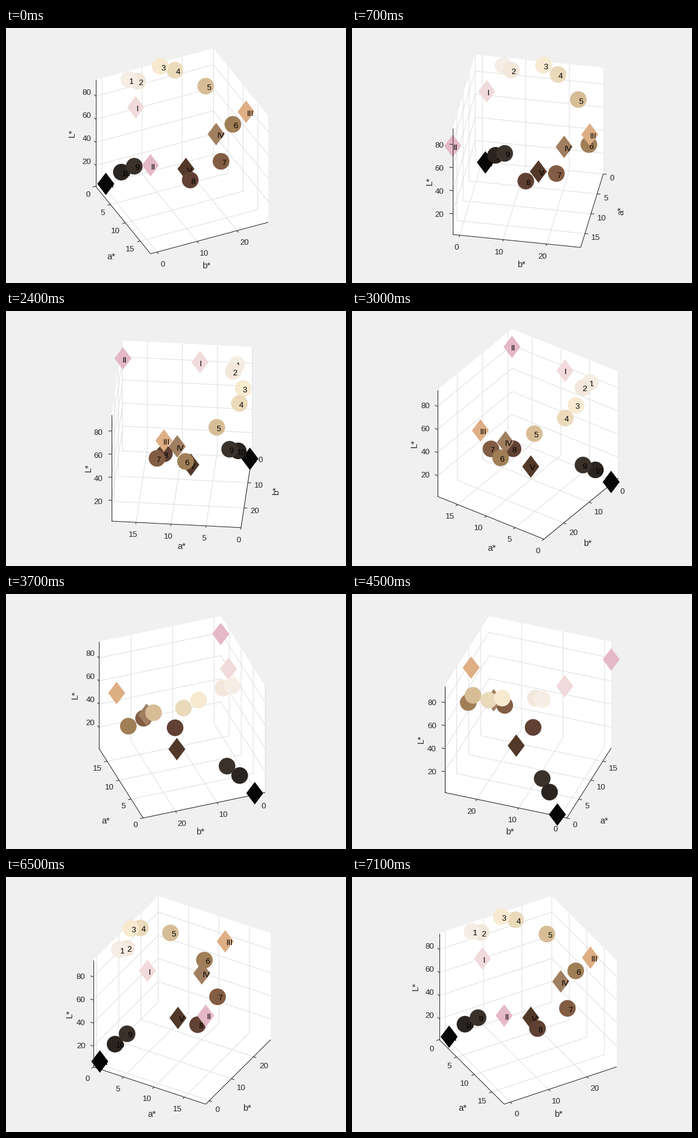
These frames come from a looping animation (560 by 420 pixels, 7200 ms). A matplotlib script:

```python
import numpy as np
import matplotlib.pyplot as plt
from matplotlib.animation import FuncAnimation
from matplotlib.collections import LineCollection
from matplotlib.patches import Circle, Polygon

W, H, DPI = 560, 420, 100
PX = 72 / DPI
FRAMES, INTERVAL = 72, 100
CX, CY = 289.8, 202.65
HALF = 107
ELEV = np.radians(35)
SE, CE = np.sin(ELEV), np.cos(ELEV)
INK = "#262626"
GRID = "#dfdfdf"
LIMITS = [(0, 18.5), (-1.6, 27.8), (2, 94.2)]
TICKS = [(0, 5, 10, 15), (0, 10, 20), (20, 40, 60, 80)]
NAMES = ["a*", "b*", "L*"]

# label, colour, position inside the cube (a, b, L from its centre)
SAMPLES = [
    ("1", "#f6ede4", (-86, -56.6, 105.8)),
    ("2", "#f3e7db", (-81, -42.5, 101.6)),
    ("3", "#f7ead0", (-102, 8, 103.3)),
    ("4", "#eadaba", (-98, 33, 90.5)),
    ("5", "#d7bd96", (-64, 73, 68.3)),
    ("6", "#a07e56", (-14.6, 99.3, 15)),
    ("7", "#825c43", (36.5, 54, -13.5)),
    ("8", "#604134", (29, 1.5, -40.3)),
    ("9", "#3a312a", (-74.3, -52, -62.3)),
    ("10", "#292420", (-87, -69.5, -77)),
    ("I", "#f1dadb", (-23.4, -73, 94.9)),
    ("II", "#e5b8c8", (107, -107, 71)),
    ("III", "#deae84", (20.5, 107, 60.3)),
    ("IV", "#a07e60", (2.5, 61, 17.5)),
    ("V", "#523828", (-16, 14.7, -50.5)),
    ("VI", "#060606", (-104.5, -89.6, -105.8)),
]
LABEL_SHIFT = np.array([1.16, 0.73, 0.19])

fig = plt.figure(figsize=(W / DPI, H / DPI), dpi=DPI, facecolor="#f0f0f0")
ax = fig.add_axes([0, 0, 1, 1])
plt.rcParams["font.family"] = "Liberation Sans"


class View:
    """Orthographic view of the cube for one azimuth."""

    def __init__(self, degrees):
        az = np.radians(degrees)
        self.c, self.s = np.cos(az), np.sin(az)

    def direction(self, v):
        a, b, z = v
        return np.array([a * self.c + b * self.s,
                         SE * (a * self.s - b * self.c) - CE * z])

    def point(self, p):
        return self.direction(p) + (CX, CY)

    def depth(self, p):
        return CE * (p[0] * self.s - p[1] * self.c) + SE * p[2]


def scaled(axis, value):
    low, high = LIMITS[axis]
    return HALF * (2 * (value - low) / (high - low) - 1)


def corner(base, axis=None, value=0):
    p = np.array(base, float) * HALF
    if axis is not None:
        p[axis] = value
    return p


def unit(axis, sign):
    v = np.zeros(3)
    v[axis] = sign
    return v


def write(x, y, s, size=13.33, color=INK, ha="center", rotation=0, z=4):
    if rotation:
        ax.text(x, y, s, size=size * PX, color=color, ha="center",
                va="center", rotation=rotation, zorder=z)
    else:
        ax.text(x, y + 0.36 * size, s, size=size * PX, color=color, ha=ha,
                va="baseline", zorder=z)


def lines(segments, color, z):
    ax.add_collection(LineCollection(segments, colors=color,
                                     linewidths=PX, zorder=z))


def draw_box(view, fa, fb):
    """White floor and back walls with their grid."""
    hull = [(-fa, -fb, 1), (-fa, fb, 1), (-fa, fb, -1),
            (fa, fb, -1), (fa, -fb, -1), (fa, -fb, 1)]
    ax.add_patch(Polygon([view.point(corner(p)) for p in hull],
                         fc="white", ec="none", zorder=0))
    paths = {
        0: [(0, fb, -1), (0, -fb, -1), (0, -fb, 1)],
        1: [(fa, 0, -1), (-fa, 0, -1), (-fa, 0, 1)],
        2: [(fa, -fb, 0), (-fa, -fb, 0), (-fa, fb, 0)],
    }
    grid = [[view.point(corner(p, axis, scaled(axis, t))) for p in path]
            for axis, path in paths.items() for t in TICKS[axis]]
    lines(grid, GRID, 1)


def draw_floor_axis(view, axis, base, out):
    ends = [view.point(corner(base, axis, e)) for e in (-HALF, HALF)]
    u = view.direction(out)
    along = ends[1] - ends[0]
    n = np.array([along[1], -along[0]]) / np.hypot(*along)
    if n @ u < 0:
        n = -n
    segments = [ends]
    for t in TICKS[axis]:
        p = view.point(corner(base, axis, scaled(axis, t)))
        segments.append([p, p + 5.35 * u])
        reach = 10 + 3.7 * len(str(t))
        x = np.sign(u[0]) * np.sqrt(abs(u[0])) * reach
        write(p[0] + x + 0.5, p[1] + 19 * n[1] + 0.5, str(t))
    lines(segments, INK, 2)

    mid = (ends[0] + ends[1]) / 2
    side, steep = np.sign(np.round(n[0], 4)), abs(n[0])
    if steep > 0.93:
        write(mid[0] + 48.5 * side, mid[1], NAMES[axis], 14.67, rotation=90)
    else:
        x = side * (47 * steep ** 2 - 8.5)
        y = 33.2 + 48.7 * steep - 18.3 * steep ** 2
        write(mid[0] + x, mid[1] + y, NAMES[axis], 14.67)


def draw_height_axis(view, la, lb):
    base = (la, lb, 0)
    ends = [view.point(corner(base, 2, e)) for e in (-HALF, HALF)]
    u = min((view.direction(unit(0, la)), view.direction(unit(1, lb))),
            key=lambda d: d[1])
    segments = [ends]
    for t in TICKS[2]:
        p = view.point(corner(base, 2, scaled(2, t)))
        segments.append([p, p + 5.35 * u])
        write(p[0] - 9.5 - 12.5 * abs(u[0]), p[1] + 1 - 30 * u[1] ** 2, str(t))
    lines(segments, INK, 90)
    mid = (ends[0] + ends[1]) / 2
    write(mid[0] - 38.5, mid[1], NAMES[2], 14.67, rotation=90)


def draw_samples(view):
    """Markers and labels, farthest first, so that near ones cover far ones."""
    items = []
    for label, color, pos in SAMPLES:
        pos = np.array(pos)
        items.append((view.depth(pos), pos, label, color))
        tag = pos + LABEL_SHIFT
        items.append((view.depth(tag), tag, label, None))
    items.sort(key=lambda item: item[0])
    for i, (_, pos, label, color) in enumerate(items):
        x, y = view.point(pos)
        z = 10 + i
        if color is None:
            write(x, y + 1.5, label, color="black", ha="left", z=z)
        elif label.isdigit():
            ax.add_patch(Circle((x, y), 13.7, fc=color, ec="none", zorder=z))
        else:
            rhomb = [(x - 14, y), (x, y - 18.5), (x + 14, y), (x, y + 18.5)]
            ax.add_patch(Polygon(rhomb, fc=color, ec="none", zorder=z))


def draw(frame):
    ax.clear()
    ax.set_xlim(0, W)
    ax.set_ylim(H, 0)
    ax.axis("off")
    # tiny shift keeps the nearest corner unambiguous at right angles
    view = View(65 + 5 * frame + 1e-6)
    fa, fb = np.sign(view.s), -np.sign(view.c)
    draw_box(view, fa, fb)
    draw_floor_axis(view, 0, (0, fb, -1), unit(1, fb))
    draw_floor_axis(view, 1, (fa, 0, -1), unit(0, fa))
    draw_height_axis(view, -np.sign(view.c), -np.sign(view.s))
    draw_samples(view)
    return []


anim = FuncAnimation(fig, draw, frames=FRAMES, interval=INTERVAL,
                     init_func=lambda: [], repeat=True, repeat_delay=0)
plt.show()
```
